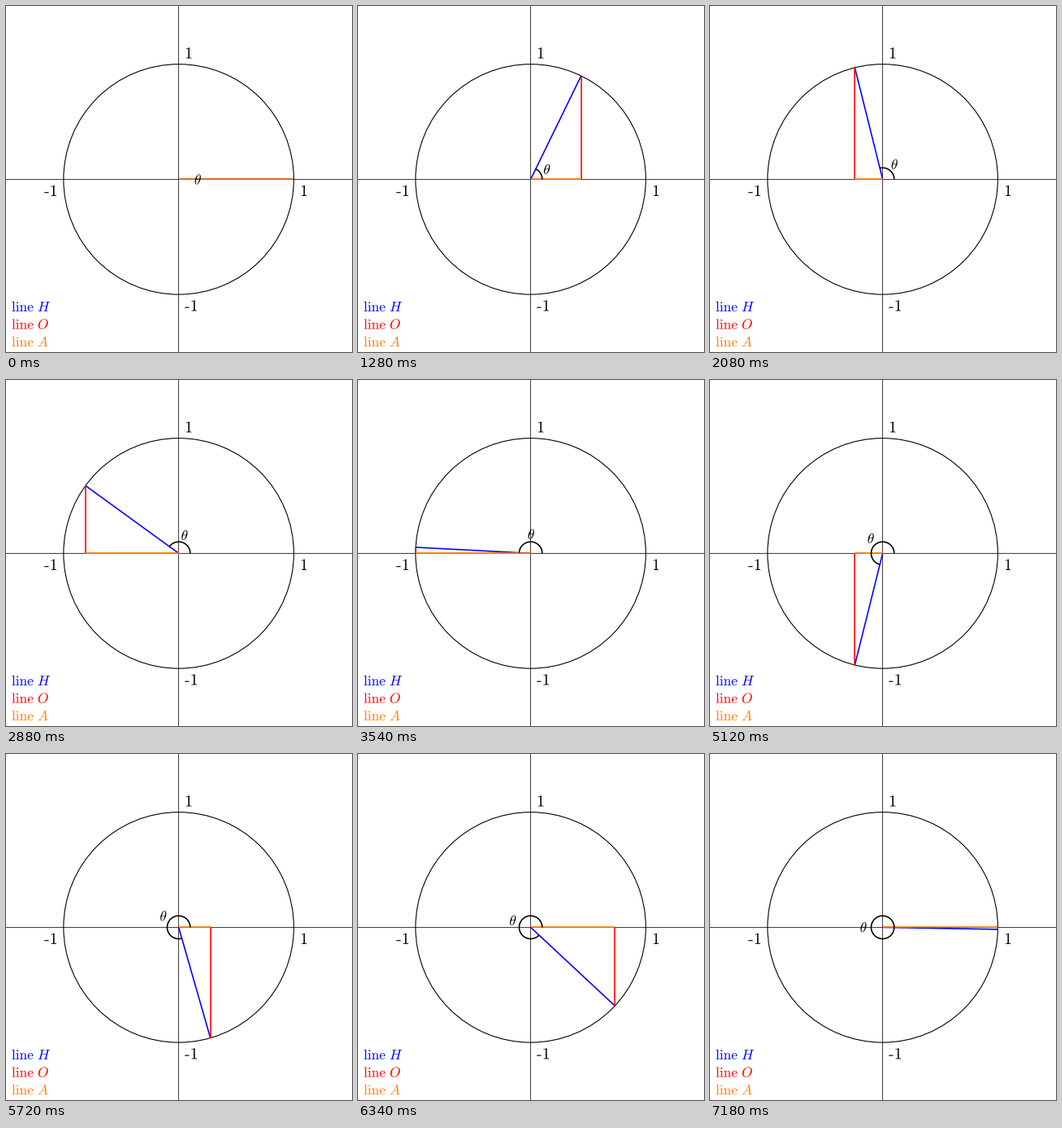
A matplotlib script for the animation above (7.2 s loop, 426 px wide and 426 px high).

```python
import numpy as np
import matplotlib.pyplot as plt
from matplotlib.animation import FuncAnimation
from matplotlib.patches import Circle, PathPatch
from matplotlib.textpath import TextPath
from matplotlib.transforms import Affine2D

SIZE = 426
C = 212.6            # centre of the diagram, in px from bottom left
R = 141.73           # unit length
ARC_R = R / 10
LABEL_R = R / 6
FRAMES = 360
BLUE, RED, ORANGE = "#0000ff", "#ff0000", "#ff8000"

plt.rcParams["mathtext.fontset"] = "cm"

fig = plt.figure(figsize=(SIZE / 72, SIZE / 72), dpi=72, facecolor="white")
ax = fig.add_axes([0, 0, 1, 1])
ax.set_xlim(0, SIZE)
ax.set_ylim(0, SIZE)
ax.axis("off")


def add_text(x, y, tex, size, color="black"):
    path = TextPath((x, y), f"${tex}$", size=size)
    ax.add_patch(PathPatch(path, fc=color, lw=0, zorder=3))


def add_line(color, lw, z, **kw):
    return ax.plot([], [], color=color, lw=lw, zorder=z,
                   solid_capstyle="butt", **kw)[0]


def add_number(x, y, negative=False, size=20):
    if negative:
        dash = add_line("black", 1.15, 3, snap=False)
        dash.set_data([x + 0.2, x + 5.5], [y + 4.3, y + 4.3])
        x += size / 3
    add_text(x, y, "1", size)


# coordinate axes and unit circle
for xs, ys in (([0, SIZE], [212.5, 212.5]), ([212.5, 212.5], [0, SIZE])):
    add_line("#404040", 1, 1, snap=False).set_data(xs, ys)
ax.add_patch(Circle((C, C), R, fill=False, ec="black", lw=1.1, zorder=1))

add_number(220, 361.5)
add_number(362, 192)
add_number(220, 50.5, negative=True)
add_number(47, 192, negative=True)

for row, (name, color) in enumerate(zip("HOA", (BLUE, RED, ORANGE))):
    add_text(7, 50 - 21.6 * row, rf"\mathrm{{line}}\ {name}", 17.28, color)

# moving parts
hyp = add_line(BLUE, 1.6, 2.1)
opp = add_line(RED, 1.6, 2.2)
adj = add_line(ORANGE, 1.6, 2.3)
arc = add_line("black", 1.6, 2.4, snap=False)

glyph = TextPath((0, 0), r"$\theta$", size=17.28)
box = glyph.get_extents()
glyph_mid = ((box.x0 + box.x1) / 2, (box.y0 + box.y1) / 2)
theta = ax.add_patch(PathPatch(glyph, fc="black", lw=0, zorder=3))


def polar(r, a):
    return C + r * np.cos(a), C + r * np.sin(a)


def update(i):
    a = 2 * np.pi * i / FRAMES
    x, y = polar(R, a)
    hyp.set_data([C, x], [C, y])
    opp.set_data([x, x], [C, y])
    adj.set_data([C, x], [C, C])
    if i:
        arc.set_data(*polar(ARC_R, np.linspace(0, a, 2 + i // 2)))
    else:
        arc.set_data([], [])
    lx, ly = polar(LABEL_R, a / 2)
    shift = Affine2D().translate(lx - glyph_mid[0], ly - glyph_mid[1])
    theta.set_transform(shift + ax.transData)
    return hyp, opp, adj, arc, theta


anim = FuncAnimation(fig, update, frames=FRAMES, interval=20,
                     repeat=True, repeat_delay=0)
plt.show()
```
